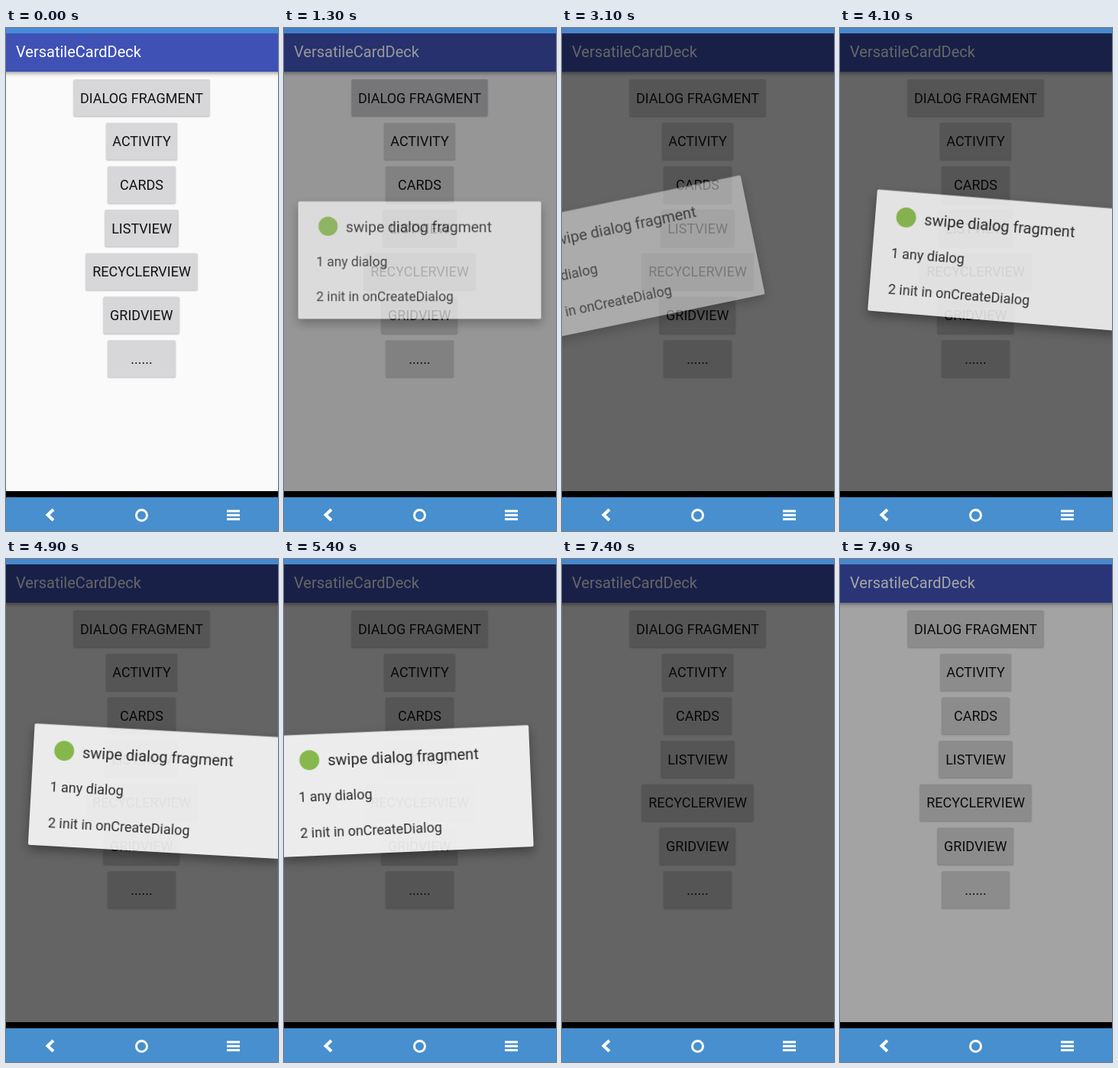
Animation of 356 by 656 pixels, one loop 8000 ms. Source, as an HTML page with a canvas:

```html
<!DOCTYPE html>
<html lang="en">
<head>
<meta charset="utf-8">
<title>Swipe dialog</title>
<style>
  html, body { margin: 0; width: 100%; height: 100%; overflow: hidden; }
  canvas { display: block; }
</style>
</head>
<body>
<canvas id="stage" width="356" height="656"></canvas>
<script>
const W = 356, H = 656, LOOP = 8000, STEP = 100;
const ctx = document.getElementById('stage').getContext('2d');

// Each track is a list of [time, value] pairs.
const dimTrack = [[1100, 0], [1400, 0.6], [7800, 0.6], [7900, 0.35]];
const fadeTrack = [[1100, 0], [1400, 1], [7200, 1], [7400, 0]];
const rowTrack = [[6100, 0], [6500, 1]];
const dragTrack = [
  [2400, 0], [2500, -6], [2800, -66], [3000, -91], [3100, -89], [3300, 0],
  [3600, 31], [4000, 31], [4100, 29], [4400, 27], [4700, 27], [4900, 20],
  [5000, 20], [5400, -18.5], [5600, -45], [5800, 0]
];

const buttons = [
  ['DIALOG FRAGMENT', 88.5, 178], ['ACTIVITY', 131, 93], ['CARDS', 133, 89],
  ['LISTVIEW', 129.5, 96], ['RECYCLERVIEW', 104.5, 146], ['GRIDVIEW', 127.5, 99.5],
  ['......', 133, 89]
];
const card = { x: 13, y: 223.5, w: 329, h: 158.5 };

function track(keys, t) {
  if (t <= keys[0][0]) return keys[0][1];
  for (let i = 1; i < keys.length; i++) {
    const [t0, v0] = keys[i - 1], [t1, v1] = keys[i];
    if (t <= t1) return v0 + (v1 - v0) * (t - t0) / (t1 - t0);
  }
  return keys[keys.length - 1][1];
}

function rect(c, color, x, y, w, h, r = 0) {
  c.fillStyle = color;
  c.beginPath();
  c.roundRect(x, y, w, h, r);
  c.fill();
}

function text(c, str, x, y, size, color, align = 'left') {
  c.font = `${size}px Roboto, sans-serif`;
  c.textAlign = align;
  c.fillStyle = color;
  c.fillText(str, x, y);
}

function shadow(c, color, blur, dy) {
  c.shadowColor = color;
  c.shadowBlur = blur;
  c.shadowOffsetY = dy;
}

function drawScreen(t) {
  rect(ctx, '#fafafa', 0, 0, W, 604);
  ctx.save();
  shadow(ctx, 'rgba(0,0,0,.4)', 5, 2);
  rect(ctx, '#3f51b5', -10, 7, W + 20, 50);
  ctx.restore();
  text(ctx, 'VersatileCardDeck', 13, 37.5, 20, '#fff');

  buttons.forEach(([label, x, w], i) => {
    const y = 67 + i * 56.7;
    const pressed = i === 0 && t >= 1000 && t < 1400;
    ctx.save();
    shadow(ctx, 'rgba(0,0,0,.25)', 2, 1);
    rect(ctx, pressed ? '#c4c3c5' : '#d7d6d8', x, y, w, 48, 1.5);
    ctx.restore();
    text(ctx, label, x + w / 2, y + 30.5, 18, '#111', 'center');
  });
}

function drawBars(t) {
  const status = t < 800 ? '#478ad8' : t < 2500 ? '#3f80cb' : '#4788cc';
  rect(ctx, status, 0, 0, W, 7);
  rect(ctx, '#000', 0, 604, W, 8);
  rect(ctx, '#478fce', 0, 612, W, 44);
  ctx.strokeStyle = '#fff';
  ctx.lineWidth = 4;
  ctx.beginPath();
  ctx.moveTo(62, 628);
  ctx.lineTo(54.5, 635);
  ctx.lineTo(62, 642);
  ctx.stroke();
  ctx.lineWidth = 3;
  ctx.beginPath();
  ctx.arc(177.5, 635.5, 7, 0, Math.PI * 2);
  ctx.stroke();
  for (let i = 0; i < 3; i++) rect(ctx, '#fff', 289, 628.5 + i * 5.3, 17, 3);
}

// The dialog is composed on its own layer so that it fades as a whole.
const layer = document.createElement('canvas');
layer.width = W + 80;
layer.height = H;
const lc = layer.getContext('2d');
lc.translate(40, 0);

function drawDialog(t) {
  const fade = track(fadeTrack, t);
  if (fade <= 0) return;
  const { x, y, w, h } = card;
  const row = track(rowTrack, t);

  lc.clearRect(-40, 0, W + 80, H);
  lc.save();
  shadow(lc, 'rgba(0,0,0,.42)', 14, 6);
  rect(lc, '#fefefe', x, y, w, h, 2);
  lc.restore();
  if (row > 0) rect(lc, `rgba(0,0,0,${0.022 * row})`, x, 279, w, 49);
  lc.fillStyle = '#8bc34a';
  lc.beginPath();
  lc.arc(53.5, 257, 13, 0, Math.PI * 2);
  lc.fill();
  text(lc, 'swipe dialog fragment', 77.5, 264.5, 20, '#1c1c1c');
  text(lc, '1 any dialog', 37.5, 311, 18, '#222');
  text(lc, '2 init in onCreateDialog', 37.5, 358, 18, '#222');

  const dx = track(dragTrack, t);
  const degrees = dx * (dx > 0 ? 0.16 : 0.131);
  const cx = x + w / 2, cy = y + h / 2;
  const scale = t < 1400 ? 0.9 + 0.1 * fade : 1;
  ctx.save();
  ctx.globalAlpha = fade * (1 - Math.abs(dx) / (w / 2));
  ctx.translate(cx + dx, cy);
  ctx.rotate(degrees * Math.PI / 180);
  ctx.scale(scale, scale);
  ctx.drawImage(layer, -cx - 40, -cy);
  ctx.restore();
}

function frame(now) {
  const t = Math.floor((now % LOOP) / STEP) * STEP;
  drawScreen(t);
  rect(ctx, `rgba(0,0,0,${track(dimTrack, t)})`, 0, 7, W, 597);
  drawDialog(t);
  drawBars(t);
  requestAnimationFrame(frame);
}
requestAnimationFrame(frame);
</script>
</body>
</html>
```
